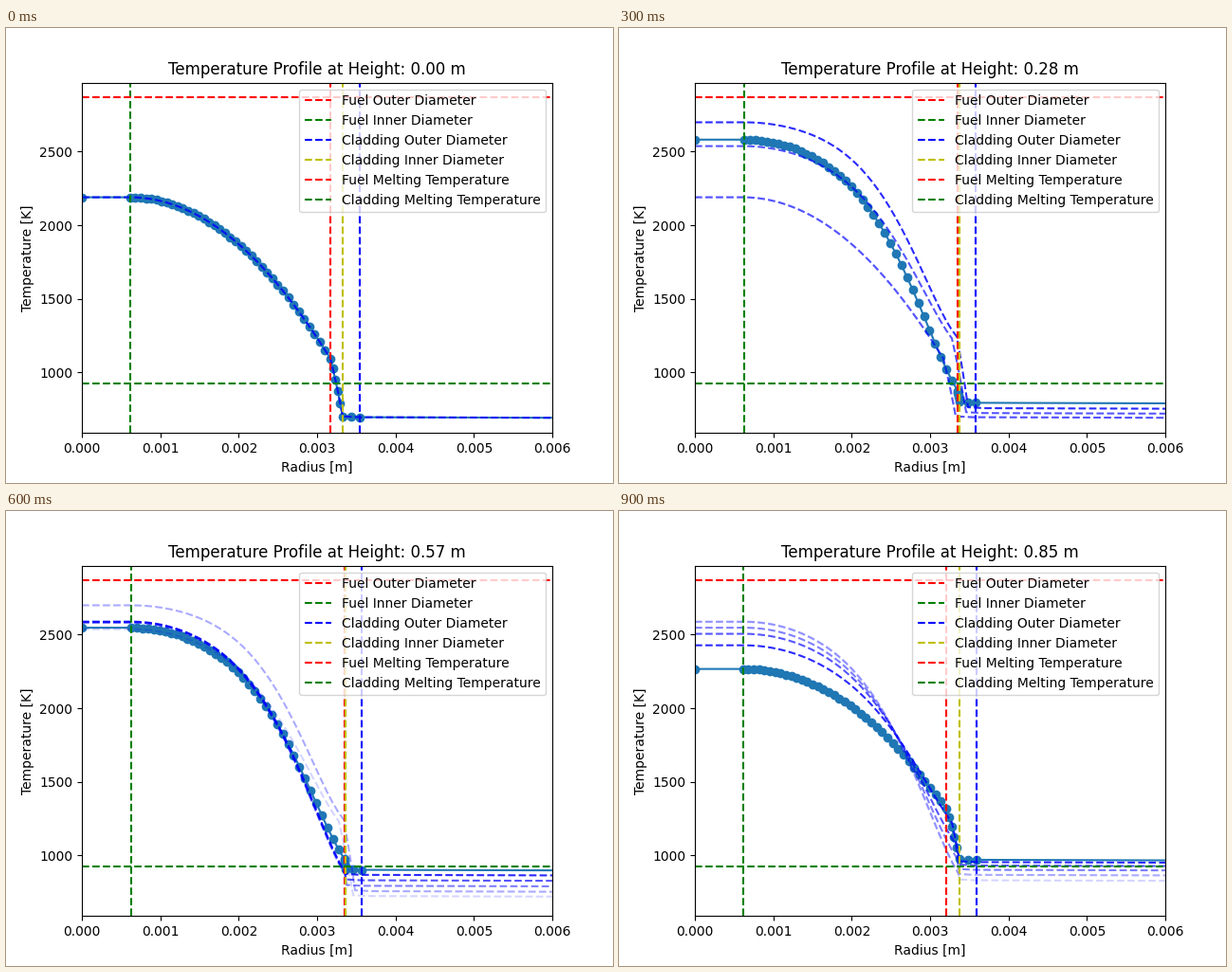
Write a matplotlib script that moves like this. It is 640 px wide and 480 px high and loops after 1000 ms.

```python
import numpy as np
import matplotlib.pyplot as plt
from matplotlib.animation import FuncAnimation

FRAMES = 10
ROD_HEIGHT = 0.85
MELT_FUEL, MELT_CLAD = 2870, 923
TRAIL = 5

# Key points along the rod: step, temperatures in K, radii in mm.
STEPS = [0, 1, 2, 3, 5, 7, 8, 9]
PEAK = [2190, 2538, 2700, 2582, 2589, 2506, 2428, 2267]
SURFACE = [1094, 1230, 1243, 875, 876, 1075, 1223, 1320]
FUEL_OUT = [3.169, 3.278, 3.339, 3.351, 3.364, 3.327, 3.278, 3.206]
CLAD_IN = [3.327, 3.460, 3.484, 3.375, 3.364, 3.363, 3.375, 3.375]


def radii(k):
    """Fuel inner, fuel outer, cladding inner and cladding outer radius in mm."""
    fuel_in = 0.615 + 0.023 * np.sin(np.pi * k / (FRAMES - 1))
    fuel_out = np.interp(k, STEPS, FUEL_OUT)
    clad_in = np.interp(k, STEPS, CLAD_IN)
    contact = max(0, 1 - (clad_in - fuel_out) / 0.03)
    return fuel_in, fuel_out, clad_in, clad_in + 0.217 - 0.037 * contact


def wall_temperature(k):
    """Coolant heat-up: the integral of a cosine power shape."""
    z = k / (FRAMES - 1)
    return 694 + 162 * (np.sin(2.1 * (z - 0.4)) + np.sin(2.1 * 0.4))


def fuel_temperature(k, u):
    """Parabolic drop, flatter in the middle the hotter the fuel is."""
    peak, surface = np.interp(k, STEPS, PEAK), np.interp(k, STEPS, SURFACE)
    flatness = (peak - 2170) / 1150
    drop = u ** 2 * (1 - flatness * (1 - u ** 3) * (1 - 1.6 * u ** 3))
    return peak - (peak - surface) * drop


def profile(k):
    """Radius in m and temperature in K from the centre to the coolant."""
    fuel_in, fuel_out, clad_in, clad_out = radii(k)
    fuel = fuel_temperature(k, np.linspace(0, 1, 39))
    outer = wall_temperature(k)
    inner = outer + 6
    gap = np.linspace(0, 1, 6)[1:]
    gap_temp = fuel[-1] + (inner - fuel[-1]) * (0.85 * gap + 0.15 * gap ** 2)
    radius = np.concatenate([
        [0], np.linspace(fuel_in, fuel_out, len(fuel)),
        fuel_out + (clad_in - fuel_out) * gap,
        [(clad_in + clad_out) / 2, clad_out, 6.2]])
    temp = np.concatenate([
        fuel[:1], fuel, gap_temp, [(inner + outer) / 2, outer, outer - 4]])
    return radius / 1000, temp


plt.rcParams["font.family"] = "DejaVu Sans"
fig, ax = plt.subplots(figsize=(6.4, 4.8), dpi=100)


def update(k):
    ax.clear()
    ax.plot(*profile(k), color="tab:blue", marker="o")

    # The first profile is in the trail twice.
    trail = ([0] + list(range(k)))[-TRAIL:]
    for age, past in zip(range(len(trail), 0, -1), trail):
        ax.plot(*profile(past), "b--", alpha=1 - age / (TRAIL + 1))

    fuel_in, fuel_out, clad_in, clad_out = radii(k)
    for radius, color, name in [(fuel_out, "r", "Fuel Outer"),
                                (fuel_in, "g", "Fuel Inner"),
                                (clad_out, "b", "Cladding Outer"),
                                (clad_in, "y", "Cladding Inner")]:
        ax.axvline(radius / 1000, color=color, ls="--", label=f"{name} Diameter")
    ax.axhline(MELT_FUEL, color="r", ls="--", label="Fuel Melting Temperature")
    ax.axhline(MELT_CLAD, color="g", ls="--", label="Cladding Melting Temperature")

    height = ROD_HEIGHT * k / (FRAMES - 1)
    ax.set(xlim=(0, 0.006), ylim=(587, MELT_FUEL + 100),
           xlabel="Radius [m]", ylabel="Temperature [K]",
           title=f"Temperature Profile at Height: {height:.2f} m")
    ax.legend(loc="upper right")
    return []


anim = FuncAnimation(fig, update, frames=FRAMES, init_func=lambda: [],
                     interval=100, repeat=True, repeat_delay=0)
plt.show()
```
